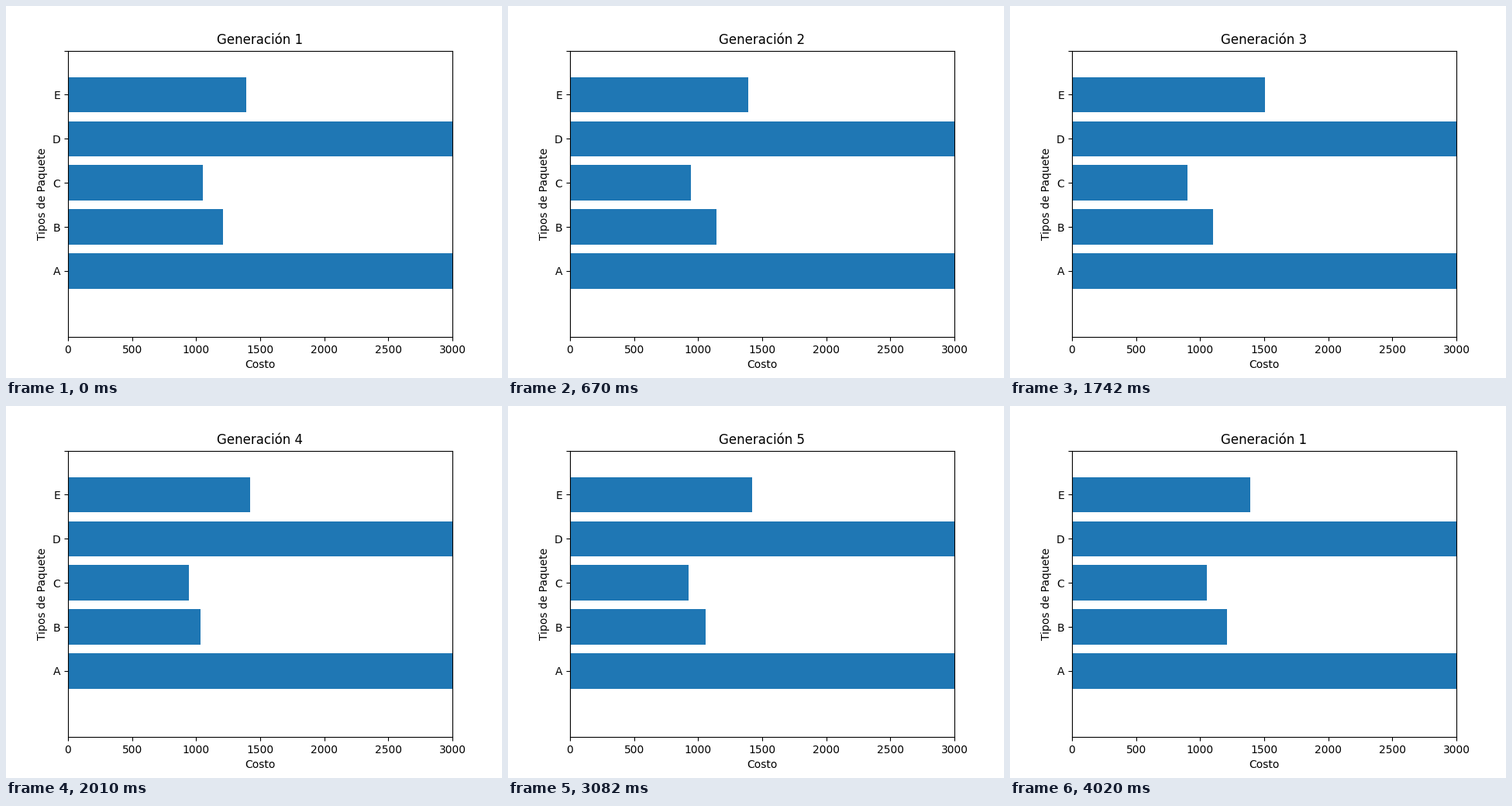
Recreate the animation shown at these times as a matplotlib script. Size 640x480 px, loop 4690 ms.

```python
import matplotlib.pyplot as plt
from matplotlib.animation import FuncAnimation

FULL = 3200  # runs past the right edge of the cost axis
COSTS = [
    [FULL, 1210, 1052, FULL, 1391],
    [FULL, 1143, 943, FULL, 1391],
    [FULL, 1101, 901, FULL, 1506],
    [FULL, 1034, 943, FULL, 1421],
    [FULL, 1058, 925, FULL, 1421],
]
HISTORY = [
    ("Mejor", "green", [1665, 1717, 1758, 1786, 1786]),
    ("Promedio", "orange", [1601, 1673, 1680, 1752, 1752]),
    ("Peor", "red", [1520, 1664, 1673, 1716, 1716]),
]
GENERATIONS = len(COSTS)
STEPS = GENERATIONS + 2  # every generation, the history, the first one again

fig = plt.figure(figsize=(6.4, 4.8), dpi=100)

bar_ax = fig.add_subplot(label="costs")
bars = bar_ax.barh(range(1, 6), COSTS[0], color="#1f77b4")
bar_ax.set_xlim(0, 3000)
bar_ax.set_ylim(-0.5, 6)
bar_ax.set_yticks(range(1, 7), ["A", "B", "C", "D", "E", ""])
bar_ax.set_xlabel("Costo")
bar_ax.set_ylabel("Tipos de Paquete")
title = bar_ax.set_title("Generación 1")

line_ax = fig.add_subplot(label="history")
for name, color, values in HISTORY:
    line_ax.plot(range(1, GENERATIONS + 1), values, color=color, label=name)
line_ax.set_xlabel("No. de Generaciones")
line_ax.set_ylabel("Ganancia")
line_ax.legend(loc="lower right", frameon=False)
heading = fig.suptitle("Historico Maximizacion")


def update(step):
    show_history = step == GENERATIONS
    bar_ax.set_visible(not show_history)
    line_ax.set_visible(show_history)
    heading.set_visible(show_history)
    if not show_history:
        index = step % (GENERATIONS + 1)
        title.set_text(f"Generación {index + 1}")
        for bar, cost in zip(bars, COSTS[index]):
            bar.set_width(cost)
    return []


anim = FuncAnimation(fig, update, frames=STEPS, interval=670,
                     init_func=lambda: update(0), repeat=True, repeat_delay=0)
plt.show()
```
